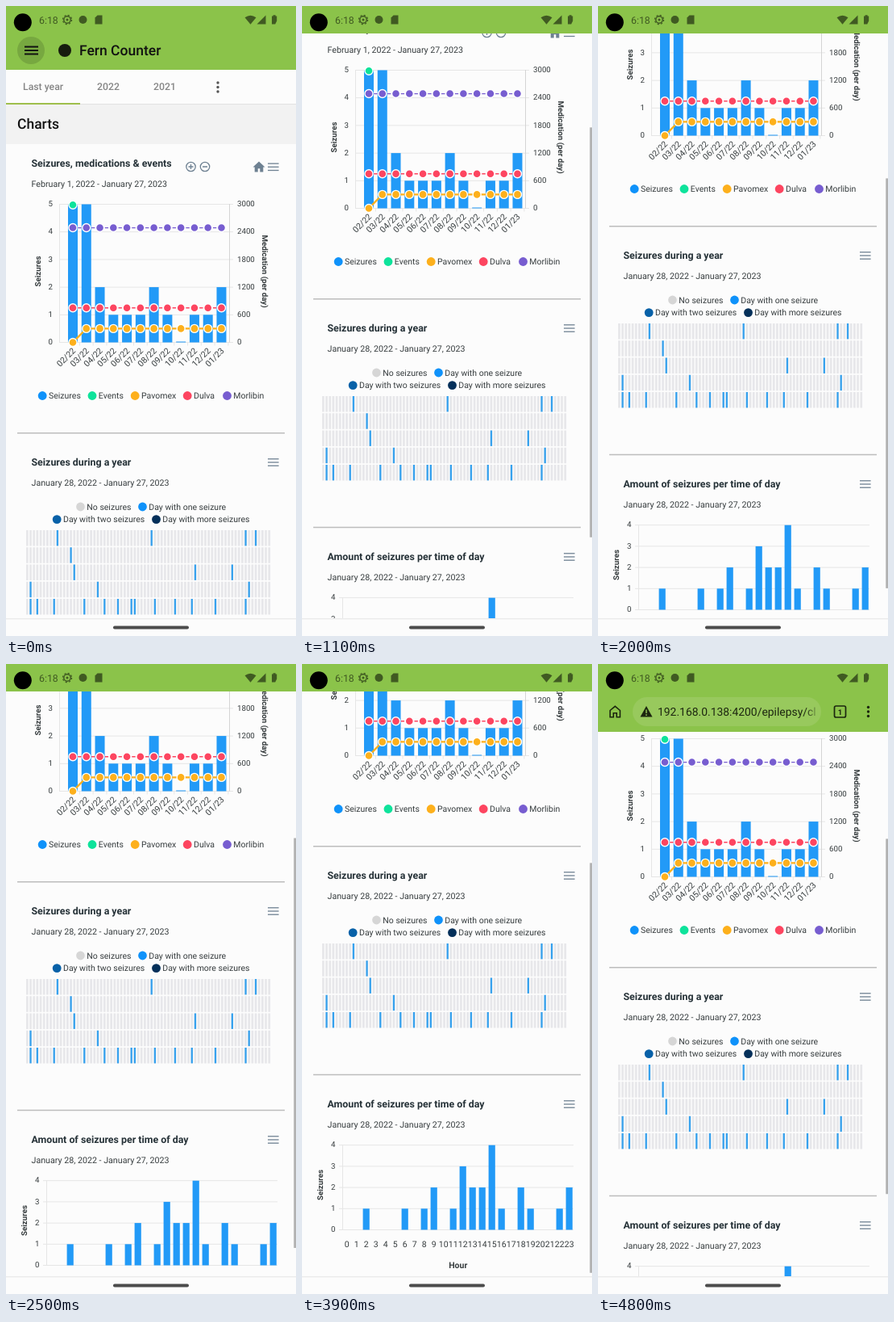
Animation of 360 by 780 pixels, one loop 4.9 s. Source, as an HTML page:

```html
<!DOCTYPE html>
<html lang="en">
<head>
<meta charset="utf-8">
<title>Seizure charts</title>
<style>
  html, body { margin: 0; width: 100%; height: 100%; overflow: hidden; background: #fcfcfc; }
  svg { display: block; width: 360px; height: 780px; }
  text { font: 10.5px Roboto, sans-serif; fill: #373d3f; text-rendering: geometricPrecision; white-space: pre; }
  .title { font-size: 12.38px; font-weight: 700; fill: #263238; }
  .sub { font-size: 10.68px; }
  .tick { font-size: 9.7px; }
  .name { font-size: 9.7px; font-weight: 700; }
  .tab { font-size: 12.25px; font-weight: 500; fill: #858585; }
  .head { font-size: 17.5px; font-weight: 500; fill: #111; }
  .mid { text-anchor: middle; }
  .end { text-anchor: end; }
  .grid { stroke: #e6e6e6; }
  .rule { stroke: #bdbdbd; stroke-width: 1.5; }
  .icon { stroke: #6e8192; stroke-width: 1.3; fill: none; }
  .bar { fill: #229af7; }
  .day { fill: #37a2ee; }
</style>
</head>
<body>
<svg viewBox="0 0 360 780">
  <defs>
    <linearGradient id="fade" gradientUnits="userSpaceOnUse" x1="257" x2="276" y1="0" y2="0">
      <stop stop-color="#1c260f"/>
      <stop offset="1" stop-color="#1c260f" stop-opacity="0"/>
    </linearGradient>
  </defs>
  <rect width="360" height="780" fill="#fcfcfc"/>

  <g id="page">
    <rect y="20" width="360" height="59" fill="#8bc34a"/>
    <circle id="ripple" cx="31" cy="55" r="17" fill="#000"/>
    <path d="M23 50.5h17M23 55h17M23 59.5h17" stroke="#111" stroke-width="1.8"/>
    <circle cx="73" cy="55" r="8" fill="#161c0e"/>
    <text class="head" x="91" y="61">Fern Counter</text>
    <text class="tab" x="21" y="104.4">Last year</text>
    <text class="tab" x="113" y="104.4">2022</text>
    <text class="tab" x="183" y="104.4">2021</text>
    <g fill="#555"><circle cx="263" cy="95" r="1.7"/><circle cx="263" cy="100.5" r="1.7"/><circle cx="263" cy="106" r="1.7"/></g>
    <rect y="122" width="360" height="49" fill="#f2f2f2"/>
    <path d="M0 121.5H360" stroke="#e2e2e2"/>
    <rect y="120" width="92" height="2" fill="#9fbf4c"/>
    <text class="head" x="14" y="152">Charts</text>
    <g class="icon">
      <circle cx="229.5" cy="199" r="5.7"/><circle cx="247" cy="199" r="5.7"/>
      <path d="M226.5 199h6M229.5 196v6M244 199h6"/>
    </g>
    <path d="M306.5 199.5l7.5-7 7.5 7h-2.2v6h-4v-4.2h-2.6v4.2h-4v-6z" fill="#6e8192"/>
    <path class="rule" d="M14 528.7H346M14 811.5H346"/>
    <g id="charts"></g>
  </g>

  <rect id="thumb" x="357.3" width="2.7" fill="#b0b0b0"/>

  <g id="toolbar">
    <rect y="34" width="360" height="50" fill="#8bc34a"/>
    <rect x="43" y="41" width="234" height="36" rx="18" fill="#98c95d"/>
    <path d="M15 57.5l6.2-5.2 6.2 5.2v8.3h-4.2v-5h-4v5h-4.2z" fill="none" stroke="#1c260f" stroke-width="1.6"/>
    <path d="M60 52l7.5 13.5h-15z" fill="#1c260f"/>
    <path d="M60 56.5v4.5M60 62.3v1.6" stroke="#98c95d" stroke-width="1.4"/>
    <text x="74" y="64" style="font-size:13.9px;fill:url(#fade)">192.168.0.138:4200/epilepsy/cl</text>
    <rect x="293.5" y="52" width="14" height="14" rx="2" fill="none" stroke="#1c260f" stroke-width="1.7"/>
    <text class="mid" x="300.4" y="62.5" style="font-size:9.5px;font-weight:700;fill:#1c260f">1</text>
    <g fill="#1c260f"><circle cx="335.5" cy="53.5" r="1.7"/><circle cx="335.5" cy="59" r="1.7"/><circle cx="335.5" cy="64.5" r="1.7"/></g>
  </g>

  <rect width="360" height="34" fill="#8bc34a"/>
  <circle cx="20.8" cy="20.3" r="11" fill="#000"/>
  <g fill="#405a22">
    <text x="41" y="22" style="font-size:12.3px;fill:#405a22">6:18</text>
    <circle cx="76" cy="17" r="4.2" fill="none" stroke="#405a22" stroke-width="1.5"/>
    <circle cx="76" cy="17" r="5.6" fill="none" stroke="#405a22" stroke-width="1.2" stroke-dasharray="2.2 2.2"/>
    <circle cx="76" cy="17" r="1.5"/>
    <circle cx="95.5" cy="17" r="5"/>
    <path d="M113.5 11.5h6v11h-9v-8z"/>
    <path d="M296.5 14.3q7-5.2 14 0l-7 8.4z"/>
    <path d="M322.5 11.5v11h-11z"/>
    <path d="M330 12.5h1.6v-1.2h3v1.2h1.6v6l-2 4h-4.2z"/>
  </g>

  <rect y="758" width="360" height="22" fill="#fcfcfc"/>
  <path d="M0 758.8H360" stroke="#e4e4e4"/>
  <rect x="133" y="767.6" width="94" height="3.8" rx="1.9" fill="#4c4c4c"/>
</svg>

<script>
const $ = id => document.getElementById(id);
const range = n => [...Array(n).keys()];
const text = (cls, x, y, s, turn = 0) =>
  `<text class="${cls}" transform="translate(${x} ${y}) rotate(${turn})">${s}</text>`;
const line = (x1, y1, x2, y2, more = 'class="grid"') =>
  `<path d="M${x1} ${y1}L${x2} ${y2}" ${more}/>`;
const dot = (x, y, r, fill, more = '') => `<circle cx="${x}" cy="${y}" r="${r}" fill="${fill}" ${more}/>`;
const bar = (x, base, w, h, cls = 'bar') =>
  `<rect class="${cls}" x="${x - w / 2}" y="${base - h}" width="${w}" height="${h}"/>`;
const key = (x, y, fill, s) => dot(x, y, 5.4, fill) + text('', x + 7.8, y + 3.5, s);

const BLUE = '#0f92fa', GREEN = '#0ee39b', AMBER = '#fdb01c', RED = '#fd4560', PURPLE = '#775dd0';

function heading(y, title, dates, menuY = y) {
  const burger = [-4.2, 0, 4.2].map(d => line(325, menuY + d, 338.6, menuY + d, 'class="icon"')).join('');
  return text('title', 31.5, y + 4.4, title) + text('sub', 31.5, y + 28.8, dates) + burger;
}

function mixedChart() {
  const base = 416.5, unit = 34.2, at = i => 83 + 16.77 * i;
  const months = range(12).map(i => String((i + 1) % 12 + 1).padStart(2, '0') + (i < 11 ? '/22' : '/23'));
  let s = heading(195, 'Seizures, medications &amp; events', 'February 1, 2022 - January 27, 2023', 199.3);
  for (const i of range(6)) {
    const y = base - unit * i;
    s += line(66, y, 282, y) + text('tick end', 58, y + 2.6, i) + text('tick', 287, y + 2.6, i * 600);
  }
  s += line(66.5, 245, 66.5, base) + line(277.5, 245, 277.5, base, 'stroke="#d4d4d4"');
  s += text('name mid', 42.5, 328.5, 'Seizures', -90) + text('name mid', 318.3, 328.5, 'Medication (per day)', 90);
  [5, 5, 2, 1, 1, 1, 2, 1, 0, 1, 1, 2].forEach((v, i) => {
    s += bar(at(i), base, 12, Math.max(v * unit, 1));
    s += line(at(i) + 8.4, base, at(i) + 8.4, base + 4);
    s += text('end', at(i) + 4, 427.5, months[i], -45);
  });
  const dashed = 'stroke-width="1.3" stroke-dasharray="4.4 3.985" stroke-dashoffset="2.2"';
  const series = [
    [AMBER, i => i ? 300 : 0, 'stroke-width="2.4"'],
    [RED, () => 750, dashed],
    [PURPLE, () => 2490, dashed],
  ];
  for (const [color, dose, stroke] of series) {
    const pts = range(12).map(i => [at(i), base - dose(i) * unit / 600]);
    s += `<polyline points="${pts}" fill="none" stroke="${color}" ${stroke}/>`;
    s += pts.map(([x, y]) => dot(x, y, 5, color, 'stroke="#fff" stroke-width="1.4"')).join('');
  }
  s += dot(at(0), 246.2, 5, GREEN, 'stroke="#fff" stroke-width="1.4"');
  return s + key(45.2, 482.5, BLUE, 'Seizures') + key(107, 482.5, GREEN, 'Events') +
    key(160.2, 482.5, AMBER, 'Pavomex') + key(225.2, 482.5, RED, 'Dulva') + key(274.5, 482.5, PURPLE, 'Morlibin');
}

function yearMap() {
  const days = [
    [9, 37, 65, 68],
    [13],
    [14, 50, 61],
    [1, 21, 66],
    [1, 3, 8, 17, 23, 27, 31, 32, 38, 44, 49, 56, 65],
  ];
  let s = heading(565, 'Seizures during a year', 'January 28, 2022 - January 27, 2023');
  s += key(92.5, 620, '#d6d6d6', 'No seizures') + key(169.5, 620, BLUE, 'Day with one seizure') +
    key(63.2, 635.6, '#0861a8', 'Day with two seizures') + key(186.5, 635.6, '#04305a', 'Day with more seizures');
  days.forEach((cols, r) => {
    const y = 658.7 + 21.25 * r;
    s += line(25, y, 329.5, y, 'stroke="#e7e7ea" stroke-width="19.4" stroke-dasharray="2.7 1.472"');
    for (const c of cols) s += bar(26.35 + 4.172 * c, y + 9.7, 2.3, 19.4, 'day');
  });
  return s;
}

function hourChart() {
  const base = 1003.5, unit = 26.2;
  const counts = [...'001000101201322410210012'].map(Number);
  let s = heading(848, 'Amount of seizures per time of day', 'January 28, 2022 - January 27, 2023');
  for (const i of range(5)) {
    const y = base - unit * i;
    s += line(46, y, 337, y) + text('tick end', 41.5, y + 2.6, i);
  }
  s += line(50.5, base - 4 * unit, 50.5, base) + text('name mid', 25.8, 948, 'Seizures', -90);
  counts.forEach((v, h) => {
    const x = 55.7 + 12 * h;
    if (v) s += bar(x, base, 8.2, v * unit);
    s += text('mid', x, 1025, h);
  });
  return s + `<text class="mid" x="193.7" y="1050.6" style="font-weight:700">Hour</text>`;
}

$('charts').innerHTML = mixedChart() + yearMap() + hourChart();

// Time in ms, then the value; straight lines between.
const SCROLL = [[0, 0], [200, 0], [300, 5], [400, 17], [500, 35], [600, 56], [800, 100], [1000, 145], [1200, 187],
  [1400, 221], [1500, 232], [1700, 247], [2000, 256], [2500, 259], [2700, 259], [2900, 271], [3100, 301],
  [3200, 309], [3700, 309], [3900, 303], [4200, 303], [4300, 297], [4400, 277], [4600, 215], [4800, 153]];
const STRETCH = [[0, 0], [3100, 0], [3200, .01], [3300, .008], [3500, 0], [4800, 0]];
const RIPPLE = [[0, .14], [400, 0], [4800, 0]];

function sample(track, t) {
  const k = Math.max(1, track.findIndex(p => p[0] >= t));
  const [[t0, a], [t1, b]] = [track[k - 1], track[k]];
  return a + (b - a) * (t - t0) / (t1 - t0);
}

const LOOP = 4900, STEP = 100, TOP = 34, BOTTOM = 758, CONTENT = 1033, BAR = 50;

function draw(t) {
  const y = Math.round(sample(SCROLL, t));
  const scale = 1 + sample(STRETCH, t);
  const shown = t > 4200 ? Math.min(BAR, 303 - y) : 0;
  const view = BOTTOM - TOP - shown;
  $('page').setAttribute('transform', `translate(0 ${BOTTOM}) scale(1 ${scale}) translate(0 ${-BOTTOM - y})`);
  $('toolbar').setAttribute('transform', `translate(0 ${shown - BAR})`);
  $('ripple').setAttribute('opacity', sample(RIPPLE, t));
  $('thumb').setAttribute('y', TOP + shown + (y + shown) * view / CONTENT);
  $('thumb').setAttribute('height', view * view / CONTENT);
  $('thumb').setAttribute('opacity', y ? 1 : 0);
}

let start;
function tick(now) {
  start ??= now;
  draw(Math.floor((now - start) % LOOP / STEP) * STEP);
  requestAnimationFrame(tick);
}
draw(0);
requestAnimationFrame(tick);
</script>
</body>
</html>
```
